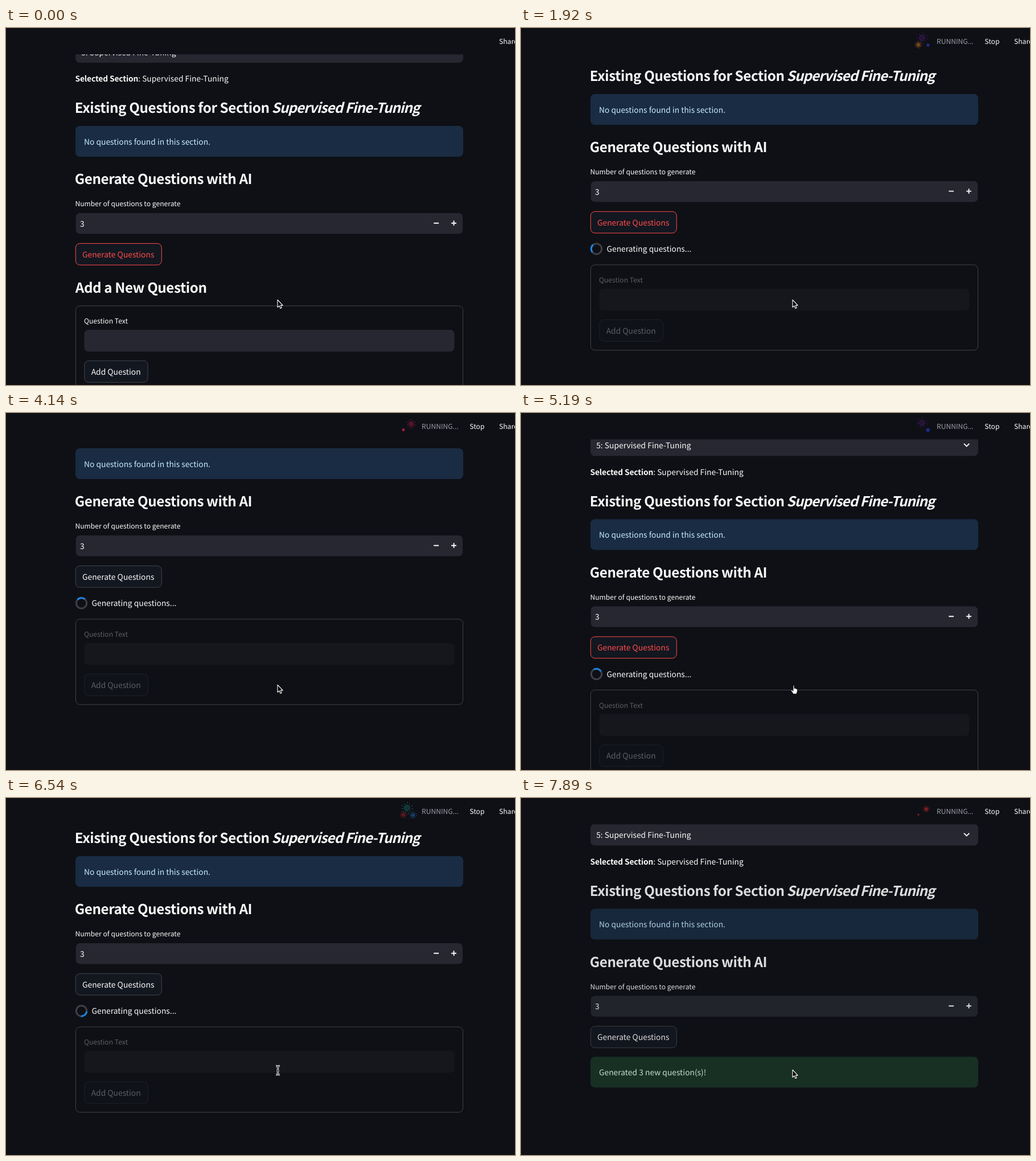
These frames come from a looping animation (894 px wide and 627 px high, 8 s). An HTML page:

```html
<!DOCTYPE html>
<html lang="en">
<head>
<meta charset="utf-8">
<title>Question generator</title>
<style>
  html, body { margin: 0; width: 100%; height: 100%; overflow: hidden; background: #0e1015; }
  svg { display: block; width: 100vw; height: 100vh; }
  text {
    font: 400 13.84px "Noto Sans CJK SC", "Noto Sans CJK JP", "Open Sans", sans-serif;
    fill: #fafafa; white-space: pre; text-rendering: geometricPrecision;
  }
  text.small { font-size: 12.11px; }
  text.strong { font-weight: 700; letter-spacing: -.15px; }
  text.head { font-size: 24.23px; font-weight: 700; letter-spacing: -.42px; }
  text.slant { font-style: italic; letter-spacing: -.95px; }
  .field { fill: #262730; }
  .line { fill: none; stroke: #404248; }
  .sign { fill: none; stroke: #fafafa; stroke-width: 1.9; }
  .btn { fill: #131720; stroke: #43454c; }
  #gen.hot rect { stroke: #ff4b4b; }
  #gen.hot text { fill: #ff4b4b; }
  .outline { fill: #000; stroke: #fff; stroke-width: 1.1; stroke-linejoin: round; }
</style>
</head>
<body>
<svg viewBox="0 0 894 627">
  <g id="page">
    <text class="small" x="122" y="11.5">Select a section to work with:</text>
    <rect class="field" x="122" y="23" width="681" height="38" rx="7.5"/>
    <text x="132.2" y="47.5">5: Supervised Fine-Tuning</text>
    <path class="sign" d="M778 39.3l4.7 4.7 4.7-4.7"/>
    <text class="strong" x="121.5" y="94.3">Selected Section</text>
    <text x="232.2" y="94.3">: Supervised Fine-Tuning</text>

    <g id="body">
      <text class="head" x="120.8" y="149.3">Existing Questions for Section</text>
      <text class="head slant" x="466.5" y="149.3">Supervised Fine-Tuning</text>
      <rect x="122" y="172" width="681" height="54" rx="7.5" fill="#192c43"/>
      <text x="137" y="204.7" style="fill:#c7ebff">No questions found in this section.</text>
      <text class="head" x="120.8" y="274.3">Generate Questions with AI</text>
      <text class="small" x="121.5" y="313">Number of questions to generate</text>
      <rect class="field" x="122.7" y="325" width="679.5" height="36.5" rx="7"/>
      <text x="130" y="348.6">3</text>
      <path class="sign" d="M751.3 342.7h8.8M782.2 342.7h8.8M786.6 338.3v8.8"/>
      <g id="gen">
        <rect class="btn" x="122.3" y="378.4" width="151" height="37.8" rx="7.5"/>
        <text x="134" y="402.6">Generate Questions</text>
      </g>
      <g id="done">
        <rect x="122" y="432" width="681" height="54" rx="7.5" fill="#1a3427"/>
        <text x="137" y="464.8" style="fill:#dffde9">Generated 3 new question(s)!</text>
      </g>
    </g>

    <text id="add" class="head" x="121.8" y="465">Add a New Question</text>
    <g id="wait">
      <g fill="none" stroke-width="3" transform="translate(132.5 444)">
        <circle r="9.2" stroke="#3d4047"/>
        <path id="arc" d="M-6.5-6.5A9.2 9.2 0 0 1 6.5-6.5" stroke="#1c83e1"/>
      </g>
      <text x="150.5" y="449.3">Generating questions...</text>
    </g>
    <g id="form">
      <rect class="line" x="122.4" y="488" width="680.2" height="150" rx="7.5"/>
      <g id="inner">
        <text class="small" x="137" y="519">Question Text</text>
        <rect class="field" x="137.4" y="530" width="650.2" height="38.5" rx="7.5"/>
        <rect class="btn" x="137.8" y="584.4" width="111.4" height="38" rx="7.5"/>
        <text x="149.7" y="608.6">Add Question</text>
      </g>
    </g>
  </g>

  <rect width="894" height="46.3" fill="#0e1015"/>
  <text class="small" x="866" y="28">Share</text>
  <g id="status">
    <text class="small" x="730" y="28" style="fill:#9b9da6">RUNNING...</text>
    <text class="small" x="814.3" y="28">Stop</text>
  </g>
  <g id="sparks" fill="none" stroke-linecap="round"></g>

  <path id="arrow" class="outline" d="M477 477.5v13l3-2.7 2 4.7 2.2-.9-2-4.5h4z"/>
  <path id="hand" d="M478 479.5c0-1.4 2-1.4 2 0v4.3c.6-.7 1.7-.5 1.9.3.6-.5 1.6-.2 1.8.6.7-.3 1.6.1 1.6 1v3c0 2-1.2 3-1.5 4.8h-5.6c-.5-2-2.6-3.6-3.6-5.6-.6-1.3 1-2 1.8-1l1.6 1.5z"
    fill="#fff" stroke="#000" stroke-width=".8"/>
  <g id="beam" fill="none">
    <path d="M474 470.5q3.5 0 3.5 2.5 0-2.5 3.5-2.5M477.5 473v10.5M474 486q3.5 0 3.5-2.5 0 2.5 3.5 2.5M475.5 479h4" stroke="#fff" stroke-width="3"/>
    <path d="M474 470.5q3.5 0 3.5 2.5 0-2.5 3.5-2.5M477.5 473v10.5M474 486q3.5 0 3.5-2.5 0 2.5 3.5 2.5M475.5 479h4" stroke="#000"/>
  </g>
</svg>
<script>
const LOOP = 8000;
const $ = id => document.getElementById(id);
const clamp = v => Math.max(0, Math.min(1, v));

const ticks = [0];
for (const [start, n, span] of [
  [300, 8, 1030], [1480, 8, 1030], [2660, 8, 1030], [3840, 7, 900],
  [4890, 7, 900], [5940, 7, 900], [6990, 3, 300], [7590, 3, 300]
]) for (let i = 0; i < n; i++) ticks.push(Math.round(start + span * i / (n - 1)));

// Page offset: time, y.
const scroll = [
  [0, 0], [1330, 0], [1480, -6], [1920, -56], [2150, -72], [2510, -79],
  [2960, -110], [4140, -110], [4440, -70], [4740, -8], [5190, 14.5],
  [5640, 37], [5940, 37], [6090, 24], [6390, -45], [6540, -70], [6840, -95],
  [6989, -95], [6990, 22.5], [LOOP, 22.5]
];

// Firework spots and bursts: start time, spot, colour.
const spots = { A: [711.7, 19.5, 8], B: [698, 29.5, 6], C: [704.3, 17.5, 10], D: [714.8, 30, 6.5] };
const bursts = [
  [430, 'A', '#d0284e'], [720, 'B', '#c22a6b'], [1000, 'D', '#2860c8'],
  [1480, 'C', '#8a22b8'], [1560, 'B', '#d07a20'], [1840, 'D', '#3038c0'],
  [2250, 'A', '#d0284e'], [2500, 'B', '#c22a6b'], [2900, 'C', '#1fb0a8'],
  [3080, 'D', '#2860c8'], [3400, 'B', '#d07a20'], [3780, 'A', '#c8204e'],
  [4050, 'B', '#c8204e'], [4380, 'D', '#2860c8'], [4760, 'C', '#7a22b0'],
  [5060, 'D', '#2a3cc0'], [5480, 'B', '#b8202c'], [5620, 'D', '#2468c0'],
  [6120, 'C', '#1fb0a8'], [6130, 'B', '#b8202c'], [6140, 'D', '#2468c0'],
  [7720, 'A', '#d02a2a'], [7840, 'B', '#8a1c24']
];
const LIFE = 700, RAYS = 11;

function offsetAt(t) {
  const i = Math.max(1, scroll.findIndex(k => k[0] >= t));
  const [t0, y0] = scroll[i - 1], [t1, y1] = scroll[i];
  return y0 + (y1 - y0) * clamp((t - t0) / (t1 - t0));
}

function burst(t, [start, spot, color]) {
  const p = (t - start) / LIFE;
  if (p <= 0 || p >= 1) return '';
  const [x, y, size] = spots[spot];
  const r = size * (1 - (1 - clamp(p * 1.8)) ** 2);
  let d = '';
  for (let i = 0; i < RAYS; i++) {
    const a = (i + .3) * 2 * Math.PI / RAYS;
    const end = r * (i % 2 ? .85 : 1);
    const at = q => (x + q * Math.cos(a)).toFixed(2) + ' ' + (y + q * Math.sin(a)).toFixed(2);
    d += `M${at(r * .3)}L${at(r * .55)}M${at(end - .8)}L${at(end)}`;
  }
  const fade = Math.min(.9, (1 - p) * 2);
  return `<g opacity="${fade.toFixed(2)}" stroke="${color}"><path d="${d}" stroke-width=".9"/>` +
    `<path d="M${x} ${y}h.01" stroke-width="2"/></g>`;
}

const show = (id, on) => $(id).style.display = on ? '' : 'none';

function draw(t) {
  const started = t >= 300, done = t >= 6990;
  $('page').setAttribute('transform', `translate(0 ${offsetAt(t).toFixed(2)})`);
  show('add', !started);
  show('wait', started && !done);
  show('form', !done);
  show('done', done);
  show('status', t >= 440 && t < 7140 || t >= 7590);
  $('form').setAttribute('transform', `translate(0 ${started ? -16 : 0})`);
  $('inner').setAttribute('opacity', 1 - .67 * clamp((t - 300) / 700));
  $('body').setAttribute('opacity', 1 - .13 * clamp((t - 7440) / 450));
  $('gen').classList.toggle('hot', t < 2660 || t >= 4890 && t < 5940);
  $('arc').setAttribute('transform', `rotate(${t * .36 - 55})`);
  $('sparks').innerHTML = bursts.map(b => burst(t, b)).join('');

  const hand = t >= 4890 && t < 5480, beam = t >= 5480 && t < 6990;
  show('hand', hand);
  show('beam', beam);
  show('arrow', !hand && !beam);
}

let last = -1;
const origin = performance.now();
function loop() {
  const now = (performance.now() - origin) % LOOP;
  const tick = ticks.filter(k => k <= now).pop() || 0;
  if (tick !== last) draw(last = tick);
  requestAnimationFrame(loop);
}
loop();
</script>
</body>
</html>
```
